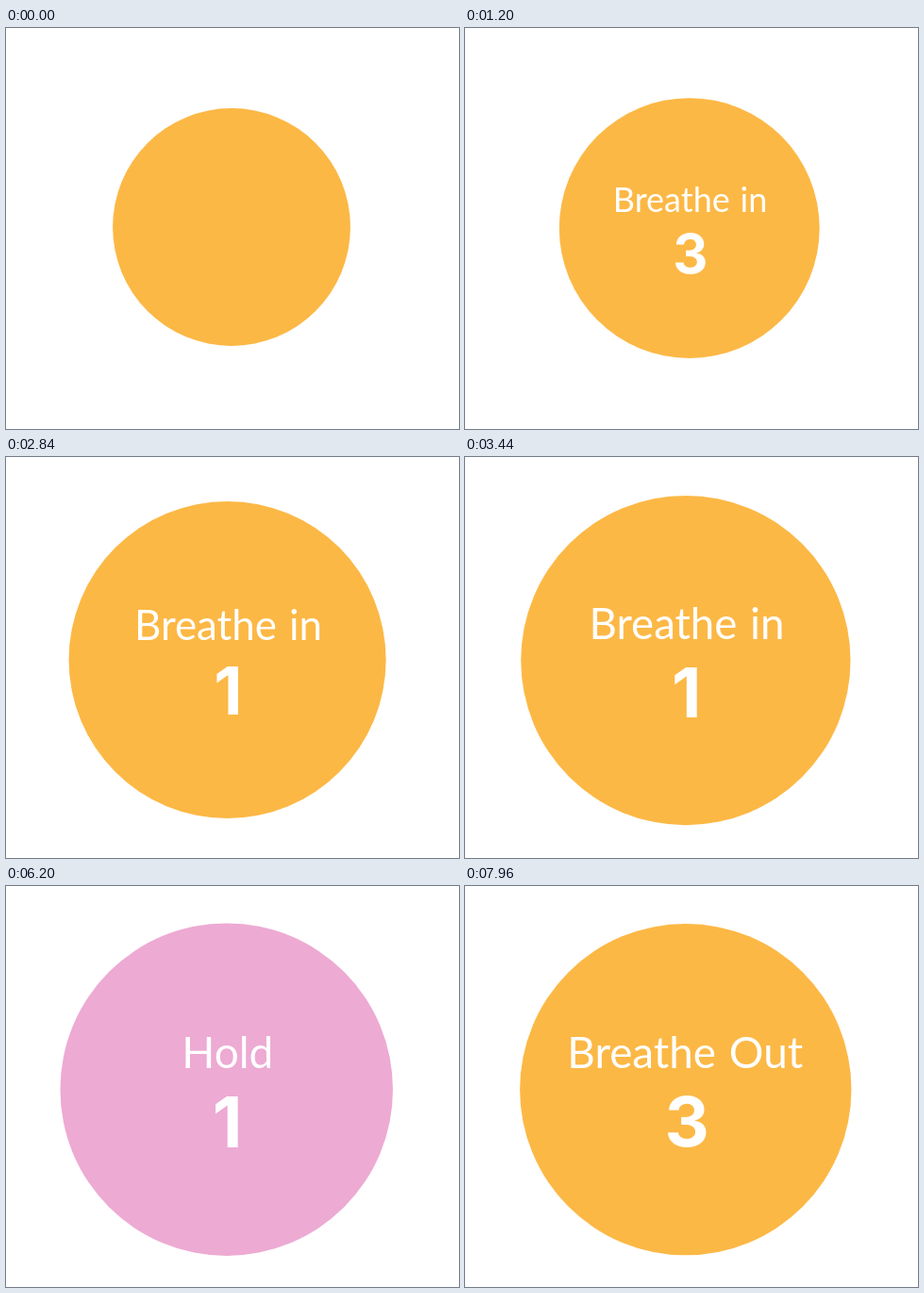
An HTML page with a canvas that plays this animation: 480 by 425 pixels, repeating every 8000 ms.

```html
<!DOCTYPE html>
<html lang="en">
<head>
<meta charset="utf-8">
<title>Breathing exercise</title>
<style>
  html, body { margin: 0; width: 100%; height: 100%; overflow: hidden; background: #fff; }
  canvas { display: block; width: 480px; height: 425px; }
</style>
</head>
<body>
<canvas id="stage"></canvas>
<script>
const LOOP = 8000, COUNT = 840, FIRST = 320;
const FULL = 352.5, SMALL = 251.7, GROW = 4000;
const YELLOW = [252, 184, 69], PINK = [237, 170, 211];

const canvas = document.getElementById('stage');
const ctx = canvas.getContext('2d');
const dpr = window.devicePixelRatio || 1;
canvas.width = 480 * dpr;
canvas.height = 425 * dpr;

const ramp = (t, from, to) => Math.min(1, Math.max(0, (t - from) / (to - from)));
const ease = p => (1 - Math.cos(Math.PI * p)) / 2;

function diameter(t) {
  const size = ease(ramp(t, -100, -100 + GROW)) - ease(ramp(t, 7680, 7680 + GROW));
  return SMALL + (FULL - SMALL) * size;
}

function fillColor(t) {
  const p = ramp(t, 3830, 4480) - ramp(t, 7200, 7840);
  return `rgb(${YELLOW.map((c, i) => Math.round(c + (PINK[i] - c) * p))})`;
}

function label(t) {
  return t < 3940 ? 'Breathe in' : t < 7300 ? 'Hold' : 'Breathe Out';
}

function digit(t) {
  const n = Math.max(0, Math.floor((t - FIRST) / COUNT));
  return String(4 - n % 4);
}

function textAlpha(t) {
  const dip = start => 1 - ramp(t, start, start + 100) + ramp(t, start + 100, start + 230);
  return ramp(t, 40, 320) * dip(3840) * dip(7200);
}

// Centres the visible ink of a line on x.
function drawText(text, font, x, y) {
  ctx.font = font;
  const m = ctx.measureText(text);
  ctx.fillText(text, x - (m.actualBoundingBoxRight - m.actualBoundingBoxLeft) / 2, y);
}

function draw(t) {
  const d = diameter(t), grown = (d - 252) / 100.5;
  ctx.setTransform(dpr, 0, 0, dpr, 0, 0);
  ctx.globalAlpha = 1;
  ctx.fillStyle = '#fff';
  ctx.fillRect(0, 0, 480, 425);

  ctx.translate(239 - 5.3 * grown, 211 + 4.7 * grown);
  ctx.scale(d / FULL, d / FULL);
  ctx.fillStyle = fillColor(t);
  ctx.beginPath();
  ctx.arc(0, 0, FULL / 2, 0, 2 * Math.PI);
  ctx.fill();

  const n = digit(t);
  ctx.globalAlpha = textAlpha(t);
  ctx.fillStyle = '#fff';
  ctx.wordSpacing = '2px';
  drawText(label(t), '400 46px Lato, sans-serif', 1.7, -22.3);
  drawText(n, '700 73.6px Inter, sans-serif', n === '1' ? 0 : 1.6, 61);
}

const start = performance.now();
function tick() {
  draw((performance.now() - start) % LOOP);
  requestAnimationFrame(tick);
}
tick();
</script>
</body>
</html>
```
